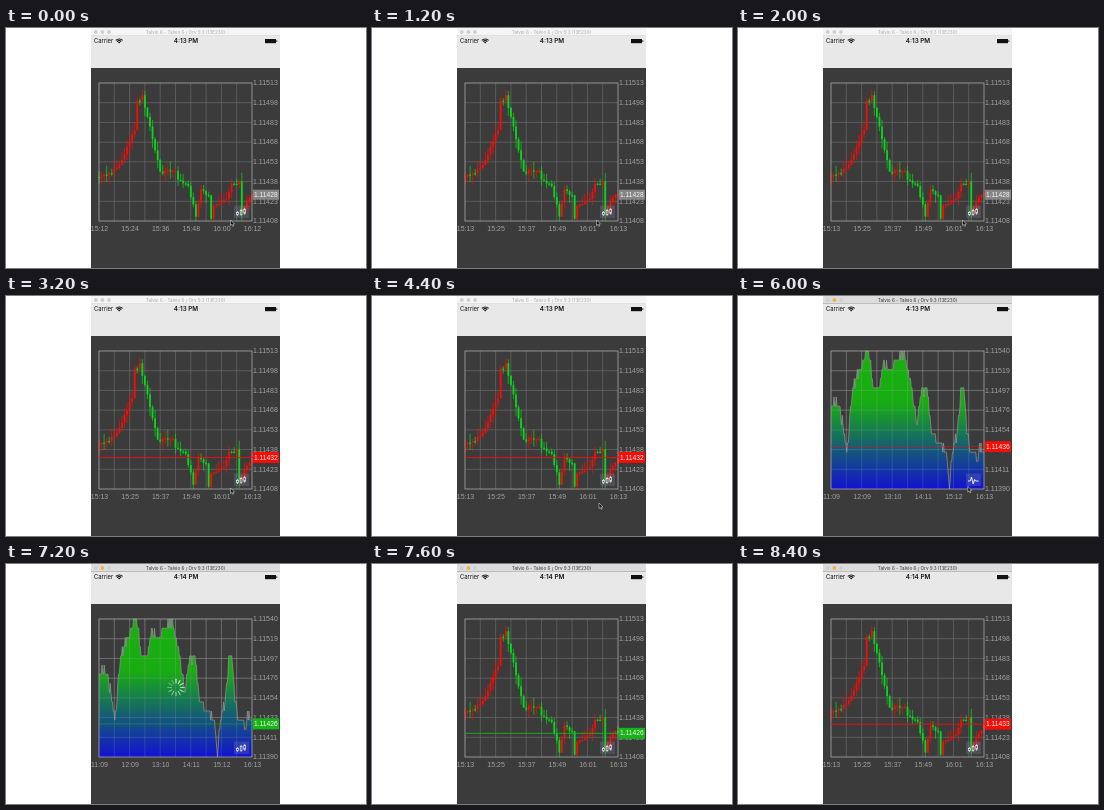
Animation of 360x240 px, one loop 8800 ms. Source, as an HTML page with a canvas:

```html
<!DOCTYPE html>
<html lang="en">
<head>
<meta charset="utf-8">
<title>Price chart</title>
<style>
html, body { margin: 0; width: 100%; height: 100%; overflow: hidden; background: #fff; }
canvas { display: block; width: 360px; height: 240px; }
</style>
</head>
<body>
<canvas id="stage"></canvas>
<script>
const LOOP = 8800, STEP = 400;
const L = 93, R = 246, T = 55, B = 193, W = R - L, H = B - T;
const RED = '#f50d08', GREEN = '#08d818';
const SANS = 'Inter, "Liberation Sans", sans-serif';
const DIGITS = '"Liberation Sans", Arial, sans-serif';
const canvas = document.getElementById('stage');
const ctx = canvas.getContext('2d');
const ratio = window.devicePixelRatio || 1;
canvas.width = 360 * ratio;
canvas.height = 240 * ratio;

// turning points of the candles: minute, height on the stage
const CANDLE_TURNS = [[0, 150], [6, 146], [10, 131], [15, 102], [16, 74], [18, 68],
  [22, 111], [25, 145], [31, 143], [32, 152], [36, 158], [39, 187], [41, 163],
  [44, 167], [45, 190], [46, 178], [51, 170], [53, 155], [56, 154], [57, 184], [61, 167]];

// turning points of the area: offset from the left, price steps below the top
const AREA_TURNS = [[0, 5.6], [9, 6], [16, 11], [22, 4], [36, 0], [38, 0], [42, 4],
  [49, 4], [53, 1.2], [57, 2.3], [66, 1], [73, 0.3], [80, 3.6], [86, 8], [91, 4.2], [96, 4.2],
  [102, 9.4], [116, 11], [118.5, 15], [121, 11], [126, 9], [130, 4], [133, 4.2],
  [136, 9.5], [146, 12], [150, 10], [153, 11.3]];

const TICKS = [
  { at: 0, price: 1.11428, color: '#858585' },
  { at: 2800, price: 1.11432, color: RED },
  { at: 5600, price: 1.11436, color: RED },
  { at: 6800, price: 1.11426, color: '#16b516' },
  { at: 8000, price: 1.11433, color: RED }
];

function noise(n) {
  const v = Math.sin(n * 127.1 + 11.7) * 43758.5453;
  return v - Math.floor(v);
}

function between(points, x) {
  let k = 1;
  while (k < points.length - 1 && points[k][0] < x) k++;
  const [x0, y0] = points[k - 1], [x1, y1] = points[k];
  return y0 + (y1 - y0) * (x - x0) / (x1 - x0);
}

function rect(x, y, w, h, color) {
  ctx.fillStyle = color;
  ctx.fillRect(x, y, w, h);
}

function line(points, color, width = 1) {
  ctx.strokeStyle = color;
  ctx.lineWidth = width;
  ctx.beginPath();
  points.forEach(([x, y]) => ctx.lineTo(x, y));
  ctx.stroke();
}

function disc(x, y, r, color) {
  ctx.fillStyle = color;
  ctx.beginPath();
  ctx.arc(x, y, r, 0, Math.PI * 2);
  ctx.fill();
}

function text(s, x, y, size, color, align = 'left', font = SANS, weight = 400) {
  ctx.font = `${weight} ${size}px ${font}`;
  ctx.fillStyle = color;
  ctx.textAlign = align;
  ctx.textBaseline = 'middle';
  ctx.fillText(s, x, y);
}

function drawWindow(active, clock) {
  rect(0, 0, 360, 240, '#fff');
  rect(85, 0, 189, 240, '#3b3b3b');
  rect(85, 0, 189, 8, active ? '#dcdcdc' : '#f5f5f5');
  rect(85, 7.2, 189, 0.8, active ? '#b4b4b4' : '#dcdcdc');
  for (let i = 0; i < 3; i++) {
    disc(89.8 + i * 6.6, 4, 1.9, active && i === 1 ? '#f0b24a' : '#cfcfcf');
  }
  text('Talvio 6 - Talvio 6 / Orv 9.3 (13E230)', 179.5, 4.2, 4.6,
    active ? '#333' : '#aaa', 'center');
  rect(85, 8, 189, 32, '#e8e8e8');
  text('Carrier', 88, 13.5, 5.9, '#111');
  for (const r of [1.2, 3, 4.8]) {
    ctx.strokeStyle = '#111';
    ctx.lineWidth = 1.1;
    ctx.beginPath();
    ctx.arc(113.2, 15.8, r, -Math.PI * 0.75, -Math.PI * 0.25);
    ctx.stroke();
  }
  text(clock, 180, 13.5, 6.3, '#111', 'center', SANS, 600);
  rect(259, 11, 11, 4.2, '#111');
  rect(270.4, 12.2, 0.8, 1.8, '#111');
}

function drawGrid(color) {
  for (let i = 1; i < 10; i++) {
    const x = L + W * i / 10;
    line([[x, T], [x, B]], color, 0.7);
  }
  for (let i = 1; i < 7; i++) {
    const y = T + H * i / 7;
    line([[L, y], [R, y]], color, 0.7);
  }
}

function drawFrame() {
  ctx.strokeStyle = '#a8a8a8';
  ctx.lineWidth = 0.8;
  ctx.strokeRect(L, T, W, H);
}

function drawLabels(low, high, start, stride) {
  for (let i = 0; i < 8; i++) {
    const price = high - (high - low) * i / 7;
    text(price.toFixed(5), 247, T + H * i / 7 + 0.3, 7, '#a2a2a2', 'left', DIGITS);
  }
  for (let i = 0; i < 6; i++) {
    const m = Math.floor(start + stride * i);
    const label = Math.floor(m / 60) + ':' + String(m % 60).padStart(2, '0');
    text(label, L + 0.5 + W * i / 5, 201.3, 7, '#a2a2a2', 'center', DIGITS);
  }
}

function drawCandles(shift, lastY) {
  const gap = W / 60;
  const level = i => i > 61 ? lastY : between(CANDLE_TURNS, i) + (noise(i + 40) - 0.5) * 4;
  ctx.save();
  ctx.beginPath();
  ctx.rect(L - 1, T, W + 2, H);
  ctx.clip();
  for (let i = 1 + shift; i <= 61 + shift; i++) {
    const x = L + (i - 1 - shift) * gap;
    const open = level(i - 1), close = level(i);
    const top = Math.min(open, close), low = Math.max(open, close);
    const color = close > open ? GREEN : RED;
    line([[x, top - noise(i) * 9], [x, low + noise(i + 90) * 9]], color, 0.7);
    rect(x - 0.9, top, 1.8, Math.max(1.2, low - top), color);
  }
  ctx.restore();
}

function drawArea() {
  const step = H / 15;
  const points = [];
  for (let x = 0; x <= W; x += 0.75) {
    const k = Math.round(between(AREA_TURNS, x) + (noise(x + 300) - 0.5) * 0.9);
    points.push([L + x, T + Math.max(0, Math.min(15, k)) * step]);
  }
  const fill = ctx.createLinearGradient(0, T, 0, B);
  fill.addColorStop(0, '#18b00f');
  fill.addColorStop(0.38, '#18ac12');
  fill.addColorStop(1, '#1212d0');
  drawGrid('#696969');
  ctx.fillStyle = fill;
  ctx.beginPath();
  ctx.moveTo(L, B);
  points.forEach(([x, y]) => ctx.lineTo(x, y));
  ctx.lineTo(R, B);
  ctx.fill();
  drawGrid('rgba(190,190,190,.25)');
  line(points, '#959595', 0.7);
}

function drawPrice(tick, y, area) {
  const live = tick.at > 0;
  ctx.globalAlpha = area ? 0.6 : 1;
  if (live) line([[L, y], [248, y]], tick.color, 0.9);
  ctx.globalAlpha = 1;
  const half = live ? 5.5 : 5;
  rect(247, y - half, 26, half * 2, tick.color);
  text(tick.price.toFixed(5), 248, y + 0.3, 6.7, '#f4f4f4', 'left', DIGITS);
}

function drawButton(pulse) {
  rect(228, 177.5, 15, 12.5, 'rgba(130,140,180,.25)');
  if (pulse) {
    line([[230, 185], [232.3, 185], [233.5, 181], [235.2, 188], [236.6, 183.5],
      [237.5, 185], [240.5, 185]], '#fff', 0.9);
    return;
  }
  for (let i = 0; i < 3; i++) {
    const x = 231.5 + i * 3.6, y = 185.5 - i * 1.1, h = i ? 4 : 2;
    line([[x, y - h / 2 - 1.5], [x, y - h / 2]], '#eee', 0.7);
    line([[x, y + h / 2], [x, y + h / 2 + 1.5]], '#eee', 0.7);
    ctx.strokeStyle = '#eee';
    ctx.strokeRect(x - 0.9, y - h / 2, 1.8, h);
  }
}

function drawSpinner(x, y) {
  ctx.lineCap = 'round';
  for (let i = 0; i < 12; i++) {
    const a = i * Math.PI / 6 - Math.PI / 2;
    const c = Math.cos(a), s = Math.sin(a);
    line([[x + c * 4.5, y + s * 4.5], [x + c * 8.3, y + s * 8.3]],
      `rgba(255,255,255,${0.8 - 0.5 * i / 11})`, 1.1);
  }
  ctx.lineCap = 'butt';
}

function drawCursor(x, y) {
  ctx.beginPath();
  [[0, 0], [0, 5.6], [1.3, 4.4], [2.2, 6.4], [3.1, 6], [2.3, 4.1], [4, 4]]
    .forEach(([dx, dy]) => ctx.lineTo(x + dx, y + dy));
  ctx.closePath();
  ctx.fillStyle = '#111';
  ctx.fill();
  ctx.strokeStyle = '#eee';
  ctx.lineWidth = 0.5;
  ctx.stroke();
}

function draw(t) {
  const area = t >= 4800 && t < 7600;
  const loading = t === 7200;
  const shift = t >= 400 ? 1 : 0;
  const [low, high] = area ? [1.1139, 1.1154] : [1.11408, 1.11513];
  const tick = TICKS.filter(k => k.at <= t).pop();
  // the marker keeps its height after the chart switches, until the next tick
  const stale = area && tick.at < 4800;
  const [pl, ph] = stale ? [1.11408, 1.11513] : [low, high];
  const y = B - H * (tick.price - pl) / (ph - pl);

  ctx.setTransform(ratio, 0, 0, ratio, 0, 0);
  drawWindow(t >= 4800, t >= 6800 ? '4:14 PM' : '4:13 PM');
  ctx.save();
  ctx.beginPath();
  ctx.rect(85, 40, 189, 200);
  ctx.clip();
  if (area) drawArea();
  else {
    drawGrid('#696969');
    drawCandles(shift, y);
  }
  drawFrame();
  if (area) drawLabels(low, high, 669, 60.8);
  else drawLabels(low, high, 912 + shift, 12);
  drawPrice(tick, y, area);
  drawButton(area && !loading);
  if (loading) drawSpinner(170, 123.5);
  if (t < 4000) drawCursor(224.5, 192);
  else if (t < 4800) drawCursor(227, 207);
  else if (t < 6800) drawCursor(229.8, 190.5);
  ctx.restore();
}

const begin = performance.now();
function tickFrame() {
  const t = (performance.now() - begin) % LOOP;
  draw(Math.floor(t / STEP) * STEP);
  requestAnimationFrame(tickFrame);
}
tickFrame();
</script>
</body>
</html>
```
